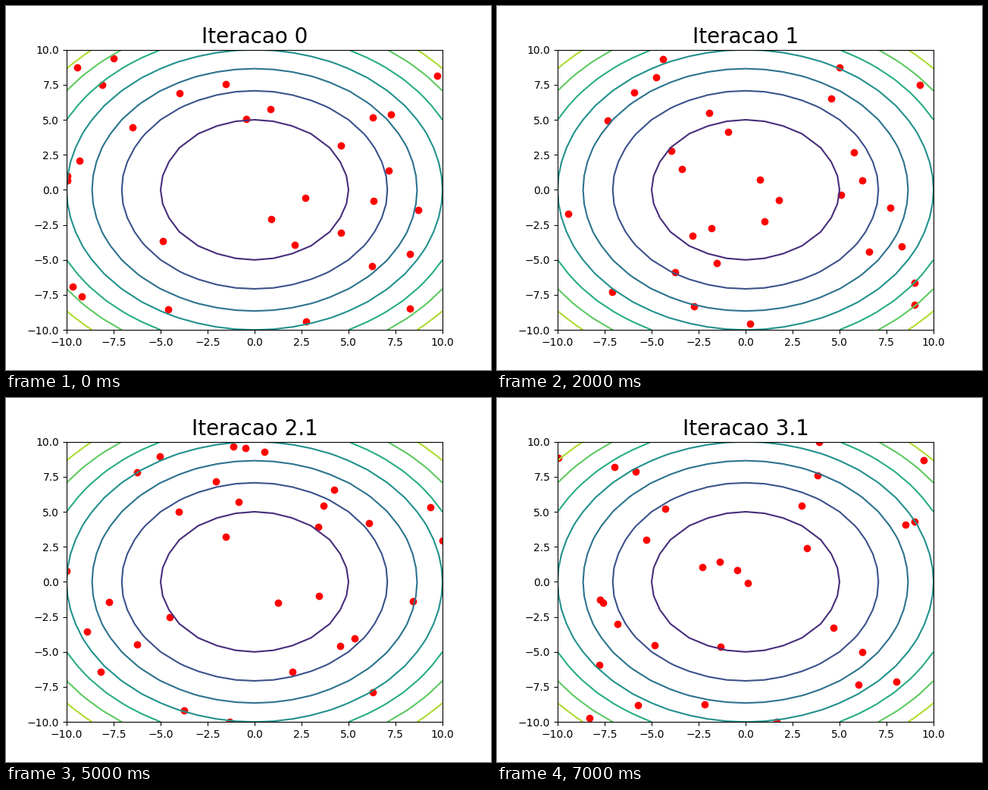
A matplotlib script that plays this animation: 640x480 px, repeating every 8 s.

```python
import numpy as np
import matplotlib.pyplot as plt
from matplotlib.animation import FuncAnimation

LIMIT = 10
SIZE = 30

# Survivors of each iteration: they keep their place in both halves
survivors = [
    [(-8.10, 7.49), (9.72, 8.14), (6.29, 5.16), (-0.44, 5.05),
     (-9.96, 1.00), (2.70, -0.57), (-4.88, -3.66), (8.27, -8.47)],
    [(9.27, 7.49), (4.56, 6.52), (6.21, 0.67), (7.70, -1.28),
     (8.31, -4.04), (1.77, -0.74), (-2.82, -3.28), (-2.74, -8.31)],
    [(-1.13, 9.65), (0.52, 9.27), (4.23, 6.57), (-0.85, 5.70),
     (10.00, 2.94), (8.43, -1.39), (-7.74, -1.44), (5.32, -4.04)],
    [(-6.98, 8.19), (3.83, 7.60), (8.51, 4.08), (-2.30, 1.05),
     (0.12, -0.09), (-7.58, -1.49), (6.21, -5.01), (8.02, -7.12)],
]


def spread(rng, count):
    """Random points, one in each of `count` horizontal bands."""
    x = rng.uniform(-LIMIT, LIMIT, count)
    y = LIMIT * (2 * (np.arange(count) + rng.random(count)) / count - 1)
    return np.column_stack([x, y])


def mutate(rng, points):
    """Shift each point along one axis: mostly a little, seldom far."""
    moved = points.copy()
    rows = np.arange(len(points))
    moved[rows, rng.integers(0, 2, len(points))] += rng.normal(size=len(points)) ** 3
    return np.clip(moved, -LIMIT, LIMIT)


steps = []
for n, kept in enumerate(survivors):
    rng = np.random.default_rng(n)
    others = spread(rng, SIZE - len(kept))
    mutants = mutate(rng, others) if n else others
    steps.append((f"Iteracao {n}", np.vstack([kept, others])))
    steps.append((f"Iteracao {n}.1", np.vstack([kept, mutants])))

fig, ax = plt.subplots(figsize=(6.4, 4.8), dpi=100)
axis = np.arange(-LIMIT, LIMIT + 1)
X, Y = np.meshgrid(axis, axis)
ax.contour(X, Y, X**2 + Y**2, levels=np.arange(0, 201, 25))
dots = ax.scatter([], [], color="red")
ax.set_xlim(-LIMIT, LIMIT)
ax.set_ylim(-LIMIT, LIMIT)
title = ax.set_title("", fontsize=20)


def draw(i):
    text, points = steps[i]
    title.set_text(text)
    dots.set_offsets(points)
    return dots, title


anim = FuncAnimation(fig, draw, frames=len(steps), interval=1000, repeat=True)
plt.show()
```
